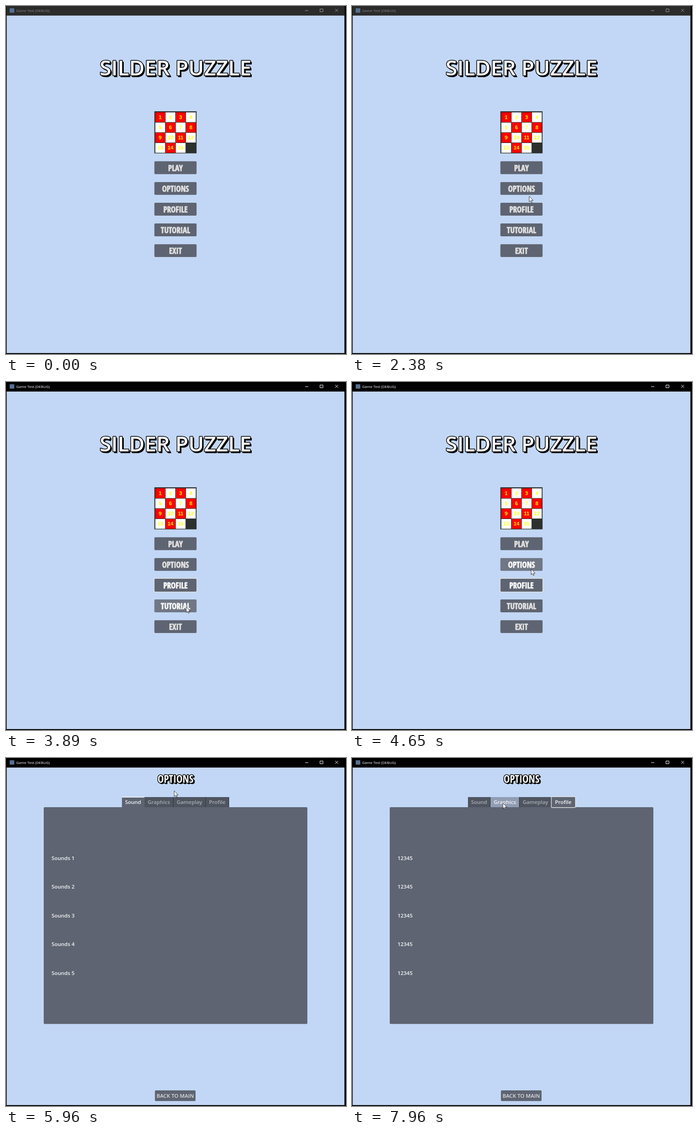
Write an HTML page with a canvas that moves like this. It is 739x757 px and loops after 8 s.

```html
<!DOCTYPE html>
<html lang="en">
<head>
<meta charset="utf-8">
<title>Slider puzzle menu</title>
<style>
  html, body { margin: 0; width: 100%; height: 100%; overflow: hidden; background: #000; }
  canvas { display: block; }
</style>
</head>
<body>
<canvas id="stage" width="739" height="757"></canvas>
<script>
const ctx = document.getElementById('stage').getContext('2d');
const LOOP = 8000;
const CENTER = 368.4;
const SKY = '#c2d7f5', PANEL = '#5e6471', HOVER = '#707785', INK = '#dfdfdf', BRIGHT = '#f6f6f6', RING = '#e0e1dc';
const UI = '"Open Sans", "Noto Sans", sans-serif';
const LABEL = `600 11.46px ${UI}`;

// Click times; the last three each select the next tab
const ACTIVATE = 2930, OPEN_OPTIONS = 5000, TAB_CLICKS = [6170, 6980, 7400];
const CLICKS = [ACTIVATE, OPEN_OPTIONS, ...TAB_CLICKS];

// Pointer glides: start time, end time, destination x and y
const ENTRY = { x: 659, y: 690 };
const GLIDES = [
  [350, 1000, 302, 193],
  [1190, 1950, 382, 379],
  [2030, 2700, 388, 444],
  [3070, 3480, 392, 496],
  [3750, 4510, 390, 422],
  [4510, 4780, 389, 394],
  [5200, 5480, 455, 553],
  [5480, 5830, 420, 9],
  [5830, 6030, 345, 95],
  [6240, 6840, 395, 95],
  [7050, 7330, 457, 98],
  [7480, 7960, 328, 98]
];

const MENU = ['PLAY', 'OPTIONS', 'PROFILE', 'TUTORIAL', 'EXIT'];
const TAB_ROWS = { Sound: 'Sounds #', Graphics: 'Visuals #', Gameplay: 'Gameplay #', Profile: '12345' };
const TABS = layoutTabs(Object.keys(TAB_ROWS));
const display = pickDisplayFace();

function layoutTabs(names) {
  ctx.font = LABEL;
  const widths = names.map(name => ctx.measureText(name).width + 14.4);
  let x = CENTER - widths.reduce((sum, w) => sum + w) / 2;
  return names.map((name, i) => {
    const left = Math.round(x);
    x += widths[i];
    return { name, x: left, w: Math.round(x) - left };
  });
}

// Heaviest narrow face available, sized so that the menu words fit their buttons
function pickDisplayFace() {
  const width = family => {
    ctx.font = `900 extra-condensed 100px ${family}`;
    return ctx.measureText('OPTIONS').width;
  };
  const family = ['"Open Sans Condensed"', '"Open Sans"', '"Noto Sans"', '"Roboto Condensed"']
    .map(name => `${name}, sans-serif`)
    .sort((a, b) => width(a) - width(b))[0];
  const size = Math.min(19.2, 5850 / width(family));
  return scale => `900 extra-condensed ${size * scale}px ${family}`;
}

function box(x, y, w, h, color, radius = 0) {
  ctx.fillStyle = color;
  ctx.beginPath();
  ctx.roundRect(x, y, w, h, radius);
  ctx.fill();
}

// Focus outline just outside the given box
function ring(x, y, w, h) {
  ctx.strokeStyle = RING;
  ctx.lineWidth = 1.43;
  ctx.beginPath();
  ctx.roundRect(x - 0.7, y - 0.7, w + 1.4, h + 1.4, 2);
  ctx.stroke();
}

function line(x1, y1, x2, y2) {
  ctx.beginPath();
  ctx.moveTo(x1, y1);
  ctx.lineTo(x2, y2);
  ctx.stroke();
}

function text(string, x, y, font, color, align = 'center', outline = 0, outlineColor = color) {
  ctx.font = font;
  ctx.textAlign = align;
  if (outline) {
    ctx.lineJoin = 'round';
    ctx.lineWidth = outline;
    ctx.strokeStyle = outlineColor;
    ctx.strokeText(string, x, y);
  }
  ctx.fillStyle = color;
  ctx.fillText(string, x, y);
}

function heading(string, y, font) {
  const drop = 2.7;
  text(string, CENTER + drop, y + drop, font, '#000', 'center', 1.6);
  text(string, CENTER, y, font, '#fff', 'center', 3, '#000');
}

function pointerAt(t) {
  if (t < GLIDES[0][0]) return null;
  let { x, y } = ENTRY;
  for (const [start, end, toX, toY] of GLIDES) {
    const k = Math.min(1, Math.max(0, (t - start) / (end - start)));
    const eased = k * k * (3 - 2 * k);
    x += (toX - x) * eased;
    y += (toY - y) * eased;
  }
  return { x, y };
}

const inside = (p, x, y, w, h) => p && p.x >= x && p.x < x + w && p.y >= y && p.y < y + h;

function drawWindow(active) {
  box(0, 0, 739, 757, '#000');
  box(1.4, 20.5, 734.2, 734.5, SKY);
  box(1, 0, 735, 20.5, active ? '#000' : '#2b2b2b');
  box(8, 5, 10, 9.5, '#55708f');
  text('Game Test (DEBUG)', 22, 12.8, `8px ${UI}`, active ? '#fff' : '#888', 'left');
  ctx.strokeStyle = active ? '#fff' : '#a0a0a0';
  ctx.lineWidth = 1;
  line(650, 10, 657, 10);
  ctx.strokeRect(682.5, 6.5, 6.5, 6);
  line(715.5, 6.3, 721.8, 12.6);
  line(721.8, 6.3, 715.5, 12.6);
}

function drawPuzzle() {
  box(322.5, 229, 91.7, 91.5, '#2c312f');
  for (let i = 0; i < 15; i++) {
    const col = i % 4, row = i >> 2, size = 21.2;
    const x = 324.6 + col * 22.2, y = 231.4 + row * 22.2;
    box(x, y, size, size, (col + row) % 2 ? '#fff' : '#f00');
    text(i + 1, x + size / 2, y + 14.4, 'bold 11.2px "Liberation Sans", Arial, sans-serif', '#ff0');
  }
}

function drawMenu(t, pointer) {
  heading('SILDER PUZZLE', 151, `600 45.84px ${UI}`);
  drawPuzzle();
  MENU.forEach((name, i) => {
    const button = [322.5, 337.8 + i * 45.1, 91.7, 27.9];
    const hover = inside(pointer, ...button);
    const focused = name === 'PROFILE' && t >= ACTIVATE;
    box(...button, hover ? HOVER : PANEL, 2);
    if (focused) ring(...button);
    text(name, CENTER, button[1] + 21, display(1), hover || focused ? BRIGHT : INK, 'center', 0.9);
  });
}

function drawOptions(t, pointer) {
  const current = TAB_CLICKS.filter(at => t >= at).length;
  heading('OPTIONS', 53.5, display(4 / 3));
  box(82, 107, 573, 471.5, PANEL, 2);
  TABS.forEach(({ name, x, w }, i) => {
    const selected = i === current;
    const hover = !selected && inside(pointer, x, 85, w, 22);
    box(x, 85, w, 22, selected ? PANEL : hover ? '#909db4' : '#4f5560');
    if (!selected) box(x + w - 1, 85, 1, 22, '#30353d');
    text(name, x + w / 2 - 0.3, 100.3, LABEL, selected || hover ? BRIGHT : '#abadb2');
  });
  const { name, x, w } = TABS[current];
  if (current) ring(x, 85, w, 22);
  else box(x, 84.5, w, 1.5, '#f4f4f4');
  for (let i = 0; i < 5; i++) {
    text(TAB_ROWS[name].replace('#', i + 1), 99, 222 + i * 62.4, LABEL, BRIGHT, 'left');
  }
  box(323.7, 723, 88.3, 23.2, PANEL, 2);
  text('BACK TO MAIN', CENTER - 0.5, 738.8, LABEL, INK);
}

function drawPointer(t, { x, y }) {
  if (CLICKS.some(at => t >= at && t < at + 70)) {
    ctx.fillStyle = '#a8a832';
    ctx.beginPath();
    ctx.arc(x - 0.5, y + 0.5, 8.6, 0, 7);
    ctx.fill();
  }
  ctx.save();
  ctx.translate(x, y);
  ctx.scale(0.74, 0.74);
  ctx.lineWidth = 1;
  ctx.strokeStyle = '#000';
  ctx.fillStyle = '#fff';
  const arrow = new Path2D('M0 0V16.5L3.8 13L6.3 18.6L8.8 17.5L6.4 12H11.6Z');
  ctx.fill(arrow);
  ctx.stroke(arrow);
  ctx.restore();
}

function render(t) {
  const pointer = pointerAt(t);
  drawWindow(t >= ACTIVATE);
  (t < OPEN_OPTIONS ? drawMenu : drawOptions)(t, pointer);
  if (pointer) drawPointer(t, pointer);
}

const start = performance.now();
function tick() {
  render((performance.now() - start) % LOOP);
  requestAnimationFrame(tick);
}
tick();
</script>
</body>
</html>
```
